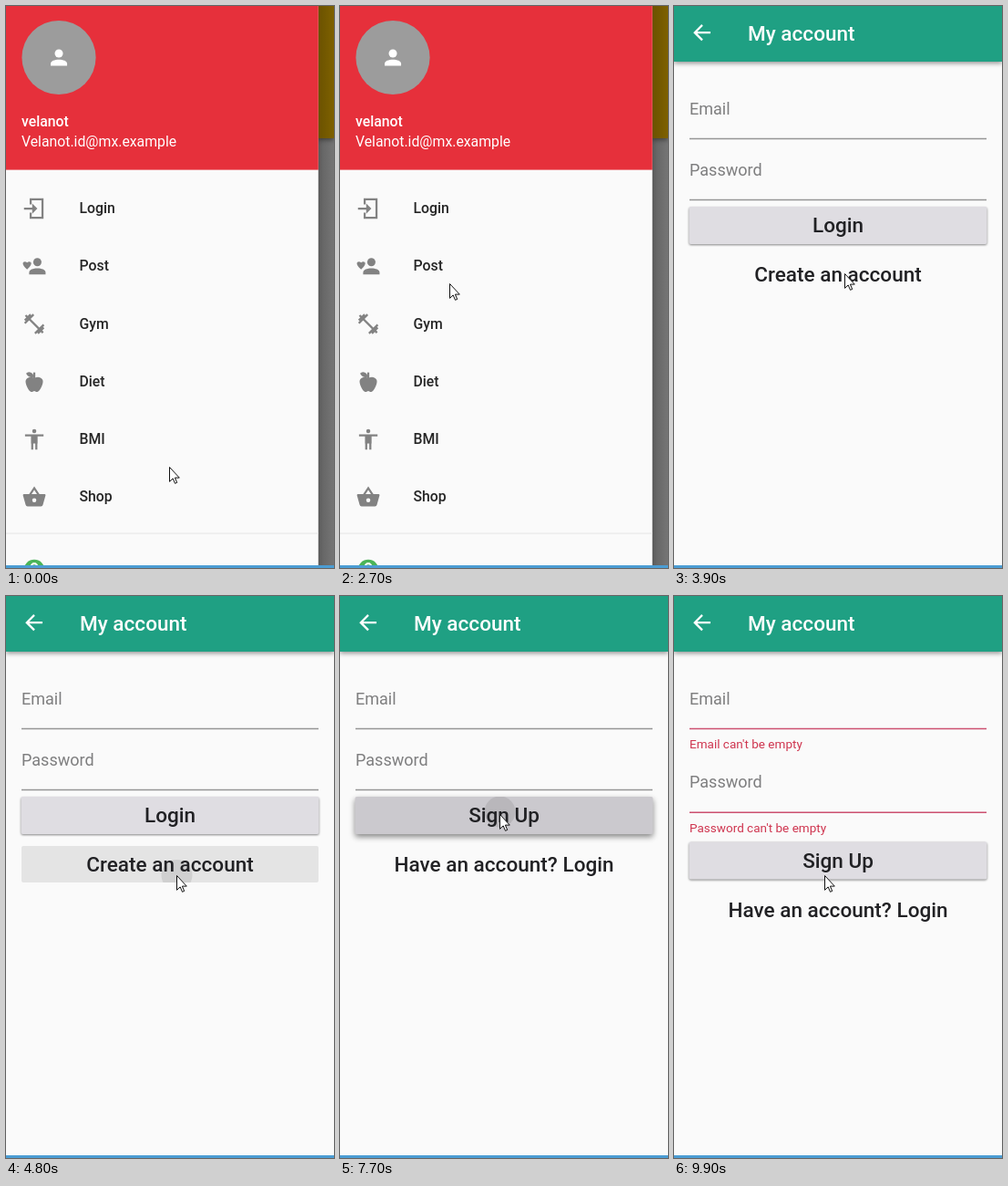
An HTML page for the animation above (10 s loop, 360x616 px).

```html
<!DOCTYPE html>
<html lang="en">
<head>
<meta charset="utf-8">
<title>Account screens</title>
<style>
html, body { margin: 0; height: 100%; overflow: hidden; background: #fafafa; }
svg { display: block; width: 360px; height: 616px; font-family: Roboto, sans-serif; }
.big { font-size: 22.56px; font-weight: 500; fill: #212124; }
.mid { text-anchor: middle; }
.label { font-size: 18.05px; fill: #7e7e7f; }
.error { font-size: 13.54px; fill: #cf3650; }
.item { font-size: 15.8px; font-weight: 500; fill: #262626; }
.line { stroke-width: 1.5; }
.bar { filter: drop-shadow(0 2px 2.5px #0006); }
.icon { fill: #828282; }
.stroke { fill: none; stroke: #828282; stroke-width: 2; }
</style>
</head>
<body>
<svg viewBox="0 0 360 616">
  <defs>
    <linearGradient id="amber"><stop stop-color="#6a5100"/><stop offset="1" stop-color="#7e6100"/></linearGradient>
    <linearGradient id="scrim"><stop stop-color="#585858"/><stop offset=".35" stop-color="#686868"/><stop offset="1" stop-color="#757575"/></linearGradient>
    <clipPath id="raisedClip"><rect x="16.5" y="220" width="327" height="41" rx="2"/></clipPath>
    <clipPath id="flatClip"><rect x="17" y="274" width="326" height="40" rx="2"/></clipPath>
    <g id="person"><circle cx="12" cy="8" r="4"/><path d="M4 20V18C4 12.7 20 12.7 20 18V20Z"/></g>
  </defs>

  <g id="drawer">
    <rect x="342" y="145" width="18" height="471" fill="url(#scrim)"/>
    <rect class="bar" x="342" width="18" height="145" fill="url(#amber)"/>
    <rect width="342.8" height="616" fill="#fafafa"/>
    <rect width="342.8" height="179.6" fill="#e6303b"/>
    <circle cx="58" cy="56.5" r="40.6" fill="#9c9c9c"/>
    <use href="#person" fill="#fff" transform="translate(44.5 43) scale(1.128)"/>
    <g font-size="15.8" fill="#fff">
      <text x="17" y="131.5" font-weight="500">velanot</text>
      <text x="17" y="154">Velanot.id@mx.example</text>
    </g>
    <g id="menu"></g>
    <path d="M0 578H343" stroke="#e4e4e4"/>
    <circle cx="31" cy="618" r="11.3" fill="#4ab458"/>
    <path d="M27.6 614.6a3.4 3.4 0 0 1 6.8 0" fill="none" stroke="#fafafa" stroke-width="2.2"/>
  </g>

  <g id="page">
    <rect width="360" height="616" fill="#fafafa"/>
    <rect class="bar" width="360" height="61" fill="#1fa083"/>
    <path d="M20 12H5M12 4.7L4.7 12L12 19.3" fill="none" stroke="#fff" stroke-width="2" transform="translate(17.5 15.6) scale(1.128)"/>
    <text class="big" x="81" y="37.6" style="fill:#fff">My account</text>

    <g>
      <text class="label" x="17" y="119">Email</text>
      <path class="line" d="M17 145.6H343"/>
      <text class="error" x="17" y="167">Email can't be empty</text>
    </g>
    <g id="password">
      <text class="label" x="17" y="185.5">Password</text>
      <path class="line" d="M17 212.5H343"/>
      <text class="error" x="17" y="234">Password can't be empty</text>
    </g>
    <g id="buttons">
      <rect id="raised" x="16.5" y="220" width="327" height="41" rx="2" fill="#dfdde2"/>
      <g id="raisedInk" clip-path="url(#raisedClip)" fill-opacity=".09">
        <rect y="210" width="360" height="60"/><circle cx="175.5" cy="236.5"/>
      </g>
      <g id="flatInk" clip-path="url(#flatClip)" fill-opacity=".09">
        <rect y="270" width="360" height="60"/><circle cx="187.5" cy="306"/>
      </g>
      <text id="submit" class="big mid" x="180" y="248"></text>
      <text id="toggle" class="big mid" x="180" y="302.2"></text>
    </g>
  </g>

  <rect y="613" width="360" height="3" fill="#4b9dd4"/>
  <path id="cursor" fill="#fff" stroke="#111" d="M.5.5V16.3L4.2 12.9 6.5 18.3 8.7 17.4 6.4 12.1H11.3Z"/>
</svg>

<script>
const $ = id => document.getElementById(id);
const clamp = v => Math.max(0, Math.min(1, v));

// Icons on a 24-unit grid
const stroke = d => `<path class="stroke" d="${d}"/>`;
const fill = d => `<path d="${d}"/>`;
const icons = {
  Login: stroke('M8.5 8V3H20V21H8.5V16M2 12H12') + fill('M10 7L15 12L10 17Z'),
  Post: '<use href="#person" x="3"/>' + fill('M5 15C-3 8 3 6 5 8.5C7 6 13 8 5 15Z'),
  Gym: `<g transform="rotate(45 12 12)">${stroke('M0 12H24M5 6V18M19 6V18M3 8V16M21 8V16')}</g>`,
  Diet: fill('M12 8.5C15 7 18 7 20 10 22 13 17 22 15 22S13 21 12 21 11 22 9 22 2 13 4 10C6 7 9 7 12 8.5Z')
    + stroke('M12 9V3') + fill('M4 4Q8 1 11 5V8Q6 8 4 4Z'),
  BMI: '<circle cx="12" cy="4" r="2"/>' + fill('M9 8H15V16H9Z') + stroke('M3 8H21M10 8V22M14 8V22'),
  Shop: fill('M2 9H22Q23 9 23 10.3L20.4 19.5Q20 21 18.5 21H5.5Q4 21 3.6 19.5L1 10.3Q1 9 2 9Z')
    + stroke('M7.5 10L12 3.3L16.5 10') + '<circle cx="12" cy="15" r="2" fill="#fafafa"/>'
};
$('menu').innerHTML = Object.entries(icons).map(([name, icon], i) => {
  const y = 222 + 63.25 * i;
  return `<g class="icon" transform="translate(17.5 ${y - 13.5}) scale(1.128)">${icon}</g>
    <text class="item" x="80.5" y="${y + 5.2}">${name}</text>`;
}).join('');

// Pointer moves: start, end, x, y
const home = [179, 505];
const moves = [
  [500, 900, 143, 353], [1200, 1800, 96, 285],
  [2300, 2700, 120, 304], [2700, 2900, 150, 334], [2900, 3200, 152, 347],
  [3400, 3800, 187, 280], [3800, 4000, 187, 306],
  [5300, 5800, 174, 256], [6000, 6300, 175, 238],
  [7600, 8600, 171, 288], [8700, 8800, 176, 296], [9000, 9900, 165, 306]
];

function pointer(t) {
  return moves.reduce((pos, [start, end, ...to]) => {
    const u = clamp((t - start) / (end - start)), k = u * u * (3 - 2 * u);
    return pos.map((v, i) => v + (to[i] - v) * k);
  }, home).map(Math.round);
}

function ink(id, age, life) {
  const group = $(id);
  group.setAttribute('opacity', age < 0 ? 0 : clamp(1 - age / life));
  group.lastElementChild.setAttribute('r', 17 + Math.max(0, age) * .7);
}

function draw() {
  const t = Math.floor(performance.now() % 10000 / 100) * 100;
  const signUp = t >= 4900, invalid = t >= 7900, pressed = t >= 7700 && t < 8000;
  const row = invalid ? 24.8 : 0;

  $('page').setAttribute('opacity', clamp((t - 2700) / 200));
  $('submit').textContent = signUp ? 'Sign Up' : 'Login';
  $('toggle').textContent = signUp ? 'Have an account? Login' : 'Create an account';
  $('password').setAttribute('transform', `translate(0 ${row})`);
  $('buttons').setAttribute('transform', `translate(0 ${2 * row})`);
  $('raised').style.filter = `drop-shadow(0 ${pressed ? '3px 3px' : '1px 1.2px'} #0007)`;
  document.querySelectorAll('.line').forEach(el => el.setAttribute('stroke', invalid ? '#cc5070' : '#959595'));
  document.querySelectorAll('.error').forEach(el => el.setAttribute('opacity', clamp((t - 7800) / 200)));
  ink('flatInk', t - 4800, 300);
  ink('raisedInk', t - 7700, 500);
  $('cursor').setAttribute('transform', `translate(${pointer(t)})`);
  requestAnimationFrame(draw);
}
draw();
</script>
</body>
</html>
```
